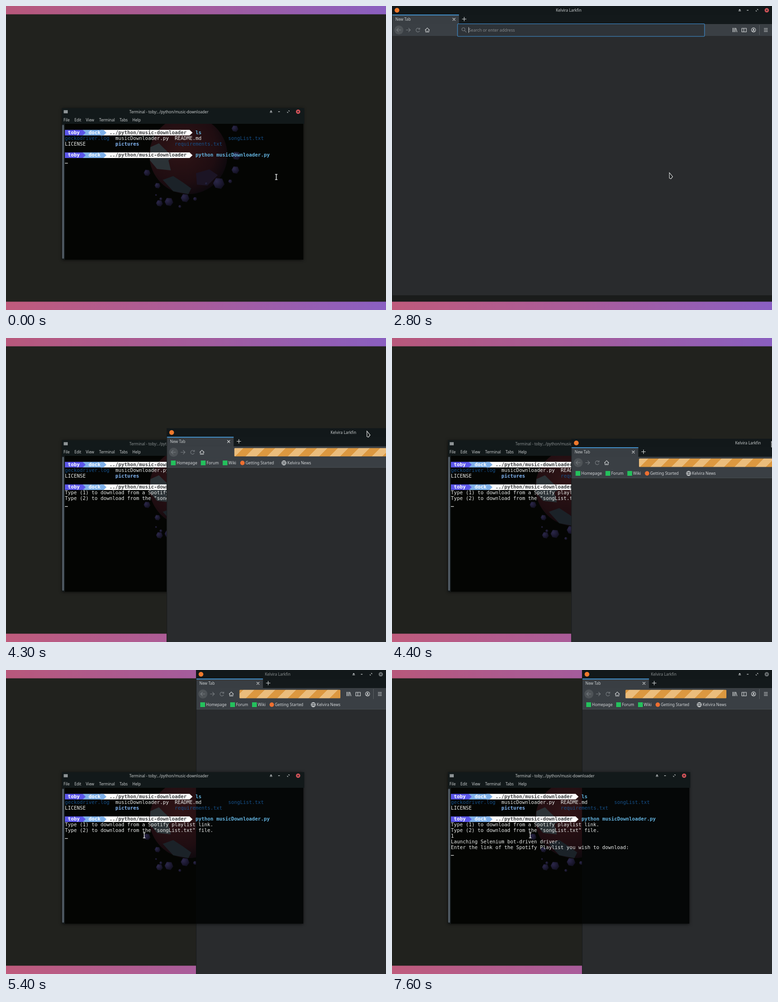
These frames come from a looping animation (800x640 px, 8 s). An HTML page:

```html
<!DOCTYPE html>
<html lang="en">
<head>
<meta charset="utf-8">
<title>Music downloader demo</title>
<style>
  html, body { margin: 0; width: 100%; height: 100%; overflow: hidden; background: #21221e; }
  svg { display: block; width: 100vw; height: 100vh; }
  text { font: 8.1px "Noto Sans", "Open Sans", sans-serif; fill: #c9cdce; white-space: pre; }
  .mono { font: 10.38px "DejaVu Sans Mono", monospace; }
  .bold { font-weight: bold; }
  .mark { font-size: 8.35px; fill: #d3d6d8; }
  .hint { font-size: 8.7px; fill: #85898c; }
  .shut { fill: #d9545a; }
  .line { fill: none; stroke: #d6d9da; stroke-width: 1.1; }
  .faint { stroke: #777c80; }
  .dim .title { fill: #8b9091; }
  .dim .shut { fill: #6c7274; }
  #pane { filter: drop-shadow(0 1px 3px #000a); }
</style>
</head>
<body>
<svg id="stage" viewBox="0 0 800 640" preserveAspectRatio="none">
  <defs>
    <linearGradient id="sky">
      <stop offset="0" stop-color="#b8587b"/>
      <stop offset=".5" stop-color="#a45c9c"/>
      <stop offset="1" stop-color="#8a5fc0"/>
    </linearGradient>
    <linearGradient id="ground">
      <stop offset="0" stop-color="#bf5b7c"/>
      <stop offset=".5" stop-color="#a95c9b"/>
      <stop offset="1" stop-color="#8a60c2"/>
    </linearGradient>
    <radialGradient id="rock" cx=".3" cy=".3" r=".8">
      <stop offset="0" stop-color="#2b2749"/>
      <stop offset="1" stop-color="#100e1d"/>
    </radialGradient>
    <radialGradient id="globe" cx=".4" cy=".4" r=".65">
      <stop offset="0" stop-color="#301416"/>
      <stop offset=".7" stop-color="#1f0d11"/>
      <stop offset="1" stop-color="#0c080d"/>
    </radialGradient>
    <clipPath id="view"><rect id="viewBox" x="124" y="248" width="502" height="286"/></clipPath>
  </defs>
  <rect width="800" height="640" fill="#21221e"/>
  <rect width="800" height="17.5" fill="url(#sky)"/>
  <rect y="622.5" width="800" height="17.5" fill="url(#ground)"/>
  <g id="term"></g>
  <g id="shell"></g>
  <g id="wide"></g>
  <g id="half"></g>
  <g id="mouse">
    <path id="arrow" d="M0 0V11.5L3.2 12.8L6.8 8.2Z" fill="#1c1f20" stroke="#e4e6e6" stroke-width="1.1"/>
    <path id="beam" d="M-2.5 -5.5H2.5M0 -5.5V5.5M-2.5 5.5H2.5" fill="none" stroke="#dcdede" stroke-width="1.5"/>
  </g>
</svg>
<script>
const $ = id => document.getElementById(id);
const LOOP = 8000, CELL = 6.25, ROW = 11.87, LEFT = 124;

const rect = (x, y, w, h, fill, more = '') =>
  `<rect x="${x}" y="${y}" width="${w}" height="${h}" fill="${fill}" ${more}/>`;
const disc = (x, y, r, fill, more = '') =>
  `<circle cx="${x}" cy="${y}" r="${r}" fill="${fill}" ${more}/>`;
const label = (x, y, text, cls = '', more = '') =>
  `<text x="${x}" y="${y}" class="${cls}" ${more}>${text}</text>`;
const line = (d, cls = '') => `<path class="line ${cls}" d="${d}"/>`;
const at = (x, y, body) => `<g transform="translate(${x} ${y})">${body}</g>`;

// Window buttons, measured from the right edge of a title bar.
const buttons = (right, y) => at(right, y, `
  <path d="M-70.5 0L-68 -2.8L-65.5 0ZM-70.5 .9H-65.5V2H-70.5Z" fill="#d0d4d5"/>
  <path d="M-53 0H-49.4" stroke="#d0d4d5" stroke-width="1.2"/>
  <path d="M-31.5 -2.2H-29.6V-.3ZM-33.8 .2V2.1H-31.9Z" fill="#d0d4d5" stroke="#d0d4d5" stroke-width=".5"/>
  <circle class="shut" cx="-11" r="4.5"/>
  <path d="M-12.7 -1.7L-9.3 1.7M-9.3 -1.7L-12.7 1.7" stroke="#23272a" stroke-width="1.1"/>`);

// ---- terminal ----
const cell = (col, row, text, fill = '#e9ebea', cls = '') =>
  label(LEFT + col * CELL, 270 + row * ROW, text, 'mono ' + cls, `style="fill:${fill}"`);

function ribbon(col, row, cells, fill) {
  const x = LEFT + col * CELL, y = 260.8 + row * ROW, end = x + cells * CELL;
  return `<path d="M${x} ${y}H${end}l${CELL} 5.9l${-CELL} 5.9H${x}Z" fill="${fill}"/>`;
}

const prompt = (row, command) =>
  ribbon(12, row, 30, '#fdfdfd') + ribbon(6, row, 7, '#7fb1ea') + ribbon(0, row, 6, '#5b56ea') +
  cell(1, row, 'toby', '#fff', 'bold') + cell(8, row, 'dock', '#fff', 'bold') +
  cell(15, row, '../python/music-downloader', '#3b3d3f', 'bold') +
  cell(44, row, command, '#62b1dd', 'bold');

const rocks = [[297, 351, 7], [319, 378, 6], [323, 415, 7], [343, 412, 9], [377, 404, 9], [398, 406, 4],
  [366, 422, 3], [448, 373, 12], [483, 345, 8], [485, 315, 9], [482, 258, 7], [472, 369, 4],
  [422, 374, 3], [326, 406, 3], [316, 398, 2]];

const planet = `<g clip-path="url(#view)">
  ${disc(384, 314, 82, 'url(#globe)')}
  <path d="M304 297L322 289L333 300L352 318L342 325L347 346L318 343L303 325Z" fill="#2b3236"/>
  <path d="M330 366L352 358L372 371L390 384L384 396L352 390Z" fill="#1b2228"/>
  <path d="M400 352L428 344L446 356L424 378L402 376Z" fill="#1b1424"/>
  ${rocks.map(([x, y, r]) =>
    `<path d="M${x - r} ${y}L${x - r * .5} ${y - r * .9}L${x + r * .6} ${y - r * .8}L${x + r} ${y + r * .2}L${x + r * .4} ${y + r}L${x - r * .6} ${y + r * .8}Z" fill="url(#rock)"/>`).join('')}
</g>`;

const menu = [['File', 121], ['Edit', 144], ['View', 168], ['Terminal', 196], ['Tabs', 239], ['Help', 266]];
const blue = '#154f88';

$('term').innerHTML =
  rect(118, 215, 508, 319, '#040503', 'id="pane"') +
  rect(118, 215, 510, 33, '#12191a') +
  rect(400, 248, 226, 286, '#050707', 'id="tint"') +
  planet +
  rect(118, 248, 6, 286, '#14191b') + rect(118.3, 250, 3.8, 282, '#535d66', 'rx="1.9"') +
  rect(121.5, 219.3, 8.5, 6.6, '#8e9496') +
  label(343, 225.6, 'Terminal - toby:../python/music-downloader', 'title', 'text-anchor="middle"') +
  buttons(626, 222.5) +
  menu.map(([word, x]) => label(x, 243, word)).join('') +
  prompt(0, 'ls') +
  cell(0, 1, 'geckodriver.log', blue) + cell(17, 1, 'musicDownloader.py') +
  cell(37, 1, 'README.md') + cell(55, 1, 'songList.txt', blue) +
  cell(0, 2, 'LICENSE') + cell(17, 2, 'pictures', '#80b3f0', 'bold') + cell(37, 2, 'requirements.txt', blue) +
  prompt(4, 'python musicDownloader.py') +
  `<g id="choice">${cell(0, 5, 'Type (1) to download from a Spotify playlist link.')}
   ${cell(0, 6, 'Type (2) to download from the "songList.txt" file.')}</g>
   <g id="answer">${cell(0, 7, '1')}</g>
   <g id="reply">${cell(0, 8, 'Launching Selenium bot-driven driver.')}
   ${cell(0, 9, 'Enter the link of the Spotify Playlist you wish to download:')}</g>` +
  rect(LEFT, 330.3, CELL, 1.2, '#e9ebea', 'id="caret"');

// ---- browser ----
const titleBar = w =>
  rect(0, 0, w, 18, '#12181a') + disc(10.5, 9, 5, '#f0792c') +
  label(w / 2 - 28, 11.8, 'Kelvira Larkfin', 'title', 'text-anchor="middle"') + buttons(w, 9);

const marks = [['Homepage', 21], ['Forum', 84], ['Wiki', 130], ['Getting Started', 166], ['Kelvira News', 254]];

const bookmarks = w =>
  rect(0, 63, w, 20, '#3a3f44') + rect(0, 82.3, w, .8, '#4b5054') +
  [9, 72, 118].map(x => rect(x, 68, 10, 10, '#24c05c')).join('') + disc(159.5, 73, 4.7, '#ee6f30') +
  at(247, 73, line('M-4.6 0A4.6 4.6 0 1 0 4.6 0A4.6 4.6 0 1 0 -4.6 0ZM-4.6 0H4.6M0 -4.6C-3 -2 -3 2 0 4.6C3 2 3 -2 0 -4.6')) +
  marks.map(([word, x]) => label(x, 76.1, word, 'mark')).join('');

const toolbar = w =>
  disc(14.5, 50.5, 9.5, '#4e5357') +
  line('M19 50.5H10M14 46.3L9.8 50.5L14 54.7M29.5 50.5H38.5M34.5 46.3L38.7 50.5L34.5 54.7', 'faint') +
  line('M57.8 48.3A4 4 0 1 0 58.2 52.2M58.6 45.8V49H55.2', 'faint') +
  line('M69.5 50.8L74.3 46.2L79.1 50.8M71 50V54.8H77.6V50M74.3 54.8V51.8') +
  at(w - 800, 0,
    line('M717.5 46V55M720 46V55M722.5 46V55M724 46.5L726.3 55') +
    line('M736.5 47H746V54.5H736.5ZM740.7 47V54.5') +
    line('M756.8 50.5A4.4 4.4 0 1 0 765.6 50.5A4.4 4.4 0 1 0 756.8 50.5M758.4 53.4Q761.2 50.8 764 53.4') +
    disc(761.2, 49.5, 1.6, '#d6d9da') + rect(773, 40, 1, 21, '#5b6064') +
    line('M783 47.3H791M783 50.5H791M783 53.7H791'));

function browser(w, h, barX, barEnd, name) {
  return `<linearGradient id="${name}Tape" gradientUnits="userSpaceOnUse" spreadMethod="repeat"
      x1="${barEnd}" y1="59" x2="${barEnd - 22.1}" y2="36.9">
      <stop offset=".5" stop-color="#dc9840"/><stop offset=".5" stop-color="#ebbd7c"/></linearGradient>` +
    rect(0, 0, w, h, '#292b2d') + titleBar(w) +
    rect(0, 18, w, 20, '#13191b') + rect(0, 18, 141, 20, '#393e43') + rect(0, 18, 141, 1.6, '#459fe4') +
    label(7, 31.3, 'New Tab') +
    line('M127.7 25.3L133.3 30.9M133.3 25.3L127.7 30.9M147.5 27.5H156.5M152 23V32') +
    rect(0, 38, w, 25, '#3a3f44') + toolbar(w) +
    `<g class="marks">${bookmarks(w)}</g>
     <g class="tape">${rect(barX, 41.8, barEnd - barX, 17.6, `url(#${name}Tape)`, 'rx="1.5"')}</g>` +
    rect(0, 0, .9, h, '#15191a');
}

$('shell').innerHTML = titleBar(800) + rect(0, 18, 800, .8, '#2b2230') + rect(0, 609, 800, 13.5, '#1a1c1b');
$('wide').innerHTML = browser(800, 640, 142.5, 653, 'wide') +
  `<g id="address">${rect(138, 37.5, 520, 26.5, '#2e3338', 'rx="1.5" stroke="#3f91d6" stroke-width="1.1"')}
   ${line('M147 49A3.3 3.3 0 1 0 153.6 49A3.3 3.3 0 1 0 147 49M152.7 51.6L156.5 55.4', 'faint')}
   ${label(161.5, 53.6, 'Search or enter address', 'hint')}${rect(161, 44.5, .9, 12, '#d9dcdd')}</g>
   <g id="edge">${rect(0, 609, 800, 13.5, '#1a1c1b')}${rect(0, 622.5, 800, 17.5, 'url(#ground)')}</g>`;
$('half').innerHTML = at(400, 0, browser(400, 640, 91.5, 304, 'half'));

// ---- motion ----
const show = (id, on) => $(id).setAttribute('display', on ? 'inline' : 'none');
const ramp = (t, a, b) => Math.min(1, Math.max(0, (t - a) / (b - a)));
const ease = p => p * p * (3 - 2 * p);

// Pointer stops: time, x, y
const path = [[700, 569, 360], [1500, 584, 351], [2900, 584, 351], [3600, 444, 163], [3800, 422, 6],
  [3900, 422, 6], [4400, 799, 218], [4700, 795, 220], [5400, 291, 348]];

function pointer(t) {
  const next = path.findIndex(stop => stop[0] > t);
  if (next === 0) return path[0].slice(1);
  if (next < 0) return path[path.length - 1].slice(1);
  const [a, b] = [path[next - 1], path[next]];
  const p = ease(ramp(t, a[0], b[0]));
  return [a[1] + (b[1] - a[1]) * p, a[2] + (b[2] - a[2]) * p];
}

function caretCell(t) {
  if (t >= 7400) return [0, 10];
  if (t >= 7200) return [1, 7];
  return [0, t >= 3900 ? 7 : 5];
}

let wasRaised = false;

function draw(now) {
  const t = Math.floor((now % LOOP) / 100) * 100;
  const raised = t >= 5300, snapped = t >= 4600;

  const open = ramp(t, 1300, 1700), size = .97 + .03 * open;
  show('shell', t > 1300 && t < 2800);
  $('shell').setAttribute('opacity', open);
  $('shell').setAttribute('transform', `translate(400 305) scale(${size}) translate(-400 -305)`);

  const drag = ease(ramp(t, 3900, 4400));
  show('wide', t >= 2800 && !snapped);
  $('wide').setAttribute('transform', `translate(${377.5 * drag} ${212 * drag})`);
  show('edge', t < 3900);
  show('address', t < 3200);
  $('wide').querySelector('.marks').setAttribute('display', t >= 3000 ? 'inline' : 'none');
  $('wide').querySelector('.tape').setAttribute('display', t >= 3200 ? 'inline' : 'none');

  show('half', snapped);
  $('half').setAttribute('class', raised ? 'dim' : '');
  $('term').setAttribute('class', t >= 2800 && !raised ? 'dim' : '');
  show('tint', raised);
  $('viewBox').setAttribute('width', raised ? 276 : 502);
  if (raised !== wasRaised) {
    $('stage').insertBefore($('term'), raised ? $('mouse') : $('shell'));
    wasRaised = raised;
  }

  show('choice', t >= 3900);
  show('answer', t >= 7200);
  show('reply', t >= 7400);
  const [col, row] = caretCell(t);
  $('caret').setAttribute('x', LEFT + col * CELL);
  $('caret').setAttribute('y', 271 + row * ROW);

  const [x, y] = pointer(t);
  const typing = t < 1500 || (t >= 4800 && x < 400);
  $('mouse').setAttribute('transform', `translate(${x} ${y})`);
  show('beam', typing);
  show('arrow', !typing);
}

function tick() {
  draw(performance.now());
  requestAnimationFrame(tick);
}
tick();
</script>
</body>
</html>
```
